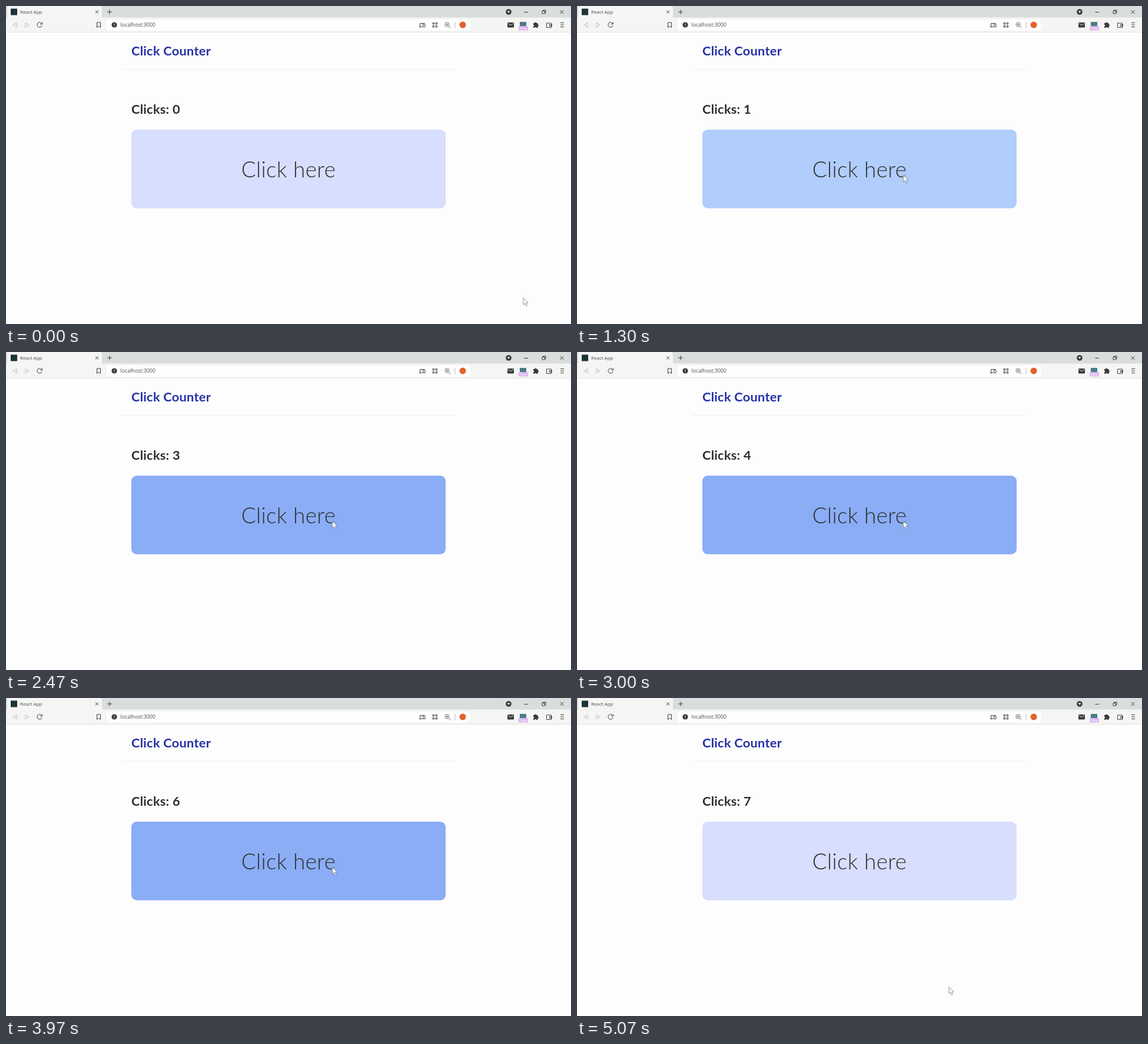
Write an HTML page that moves like this. It is 960 px wide and 540 px high and loops after 5110 ms.

```html
<!DOCTYPE html>
<html lang="en">
<head>
<meta charset="utf-8">
<title>Click Counter</title>
<style>
html, body { margin: 0; width: 100%; height: 100%; overflow: hidden; background: #fdfdfd; }
svg { display: block; width: 100%; height: 100%; }
.ui { font-family: "Open Sans", "Noto Sans", sans-serif; fill: #4a4a4a; }
.page { font-family: Lato, "Open Sans", sans-serif; font-weight: 700; font-size: 21.8px; letter-spacing: .25px; fill: #2e2e2e; }
.line { fill: none; stroke: #3c3c3c; stroke-width: 1; }
.pale { fill: none; stroke: #bcbcbc; stroke-width: 1; }
.dark { fill: #383838; }
</style>
</head>
<body>
<svg viewBox="0 0 960 540">
  <rect width="960" height="540" fill="#fdfdfd"/>

  <!-- tab strip -->
  <rect width="960" height="20" fill="#d9dddd"/>
  <path d="M2 20V3q0-3 3-3H160q3 0 3 3V20z" fill="#f5f5f4"/>
  <rect x="8" y="4.500" width="11" height="11" fill="#1d3437"/>
  <text class="ui" x="24" y="13" font-size="8">React App</text>
  <path class="line" d="M152 7.500l5 5m0-5l-5 5M172 10h8M176 6v8"/>
  <circle class="dark" cx="854" cy="10" r="4.800"/>
  <path d="M851.500 8.500h5l-2.500 3.500z" fill="#f5f5f4"/>
  <path class="line" d="M880.500 10.500h6.500M911 8.500h4.500V13H911zM912.500 8V7H917v4.500h-1M941.500 7l6 6m0-6l-6 6"/>

  <!-- toolbar -->
  <rect y="19.500" width="960" height="25" fill="#f5f5f4"/>
  <rect y="44" width="960" height="1" fill="#e2e2e0"/>
  <rect x="171" y="23" width="617" height="18.500" rx="2" fill="#fefefe"/>
  <path class="pale" d="M18 28.500v7L12 32zM33 28.500v7L39 32z"/>
  <path class="line" d="M60.500 29.500A4.200 4.200 0 1 0 61.200 33M61.500 27.500v3.200h-3.500M154.500 28h6v8.500l-3-2.500-3 2.500z"/>
  <circle class="dark" cx="184" cy="32" r="4.600"/>
  <path d="M184 29.500v3m0 1v1.200" stroke="#fefefe"/>
  <text class="ui" x="194.500" y="35" font-size="8.800">localhost:3000</text>
  <path class="line" d="M702 35.500h5M703.500 35v-5.500h8M708.500 31h3.500v4.500h-3.500z"/>
  <path class="line" d="M725 28.500h2.500V31H725zM730 28.500h2.500V31H730zM725 33.500h2.500V36H725zM730 33.500h2.500V36H730z"/>
  <g opacity=".75">
    <path class="line" d="M752.500 34.500l3 3M747.500 31.500h4M749.500 29.500v4"/>
    <circle class="line" cx="749.500" cy="31.500" r="3.600"/>
  </g>
  <path class="pale" d="M763 27v11"/>
  <circle cx="776" cy="32" r="5.500" fill="#e2622c"/>
  <rect class="dark" x="852" y="28" width="11" height="8.500" rx="1"/>
  <path d="M853 29.500l4.500 3.200 4.500-3.200" fill="none" stroke="#f5f5f4"/>
  <rect x="873" y="27" width="11" height="8" fill="#4a7c86"/>
  <rect x="871" y="34" width="16" height="7.500" rx="1.500" fill="#dcb4ee"/>
  <text class="ui" x="879" y="40" font-size="6" text-anchor="middle" style="fill:#fff">New</text>
  <path class="dark" d="M896 29h2.200a1.600 1.600 0 0 1 3.200 0h2.100v2.200a1.600 1.600 0 0 1 0 3.200V37h-2.600a1.300 1.300 0 0 0-2.600 0H896v-2.500a1.300 1.300 0 0 0 0-2.600z"/>
  <path class="line" d="M918.500 29h8v7.500h-8zM923.500 31.500h4v2.800h-4zM942 28.500h6M942 32h6M942 35.500h6"/>

  <!-- page -->
  <text class="page" x="213" y="83.500" style="fill:#2430a6">Click Counter</text>
  <path d="M196 107.500H764" stroke="#ececf1"/>
  <text class="page" id="count" x="213" y="182.500">Clicks: 0</text>
  <rect id="button" x="213" y="210" width="534" height="133.500" rx="9"/>
  <text class="page" x="480" y="291" text-anchor="middle" style="font-size:37px;font-weight:300;letter-spacing:.3px">Click here</text>
  <path id="cursor" d="M0 0V11.800L2.700 9.300 4.700 13.900 6.600 13 4.600 8.600H8.200z" fill="#fff" stroke="#7c7c7c" stroke-width=".8" stroke-linejoin="round"/>
</svg>
<script>
const LOOP = 5110;
const IDLE = [216, 222, 253], HOVER = [180, 208, 251], ACTIVE = [138, 173, 246];
// press and release time of each click
const clicks = [[1000, 1170], [1430, 1600], [1930, 2110], [2280, 2560],
                [2810, 3010], [3220, 3490], [3740, 4150]];
const fades = [
  [410, HOVER, 400],
  ...clicks.flatMap(([down, up]) => [[down, ACTIVE, 190], [up, HOVER, 190]]),
  [4600, IDLE, 380]
];
const path = [[30, 879, 495.5], [530, 554.5, 287], [4470, 554.5, 287], [4800, 632, 490.5]];

const get = id => document.getElementById(id);
const count = get("count"), button = get("button"), cursor = get("cursor");
const part = (t, start, length) => Math.min(1, Math.max(0, (t - start) / length));
const mix = (a, b, k) => a + (b - a) * k;
const easeOut = k => 1 - (1 - k) ** 2;
const easeInOut = k => k * k * (3 - 2 * k);

function draw(now) {
  const t = now % LOOP;
  const clicked = clicks.filter(([, up]) => t >= up).length;
  count.textContent = "Clicks: " + clicked;

  let color = IDLE;
  for (const [start, target, length] of fades) {
    const k = easeOut(part(t, start, length));
    color = color.map((v, i) => mix(v, target[i], k));
  }
  button.setAttribute("fill", `rgb(${color.map(Math.round)})`);

  let [, x, y] = path[0];
  for (let i = 1; i < path.length; i++) {
    const [from] = path[i - 1], [to, nx, ny] = path[i];
    const k = easeInOut(part(t, from, to - from));
    x = mix(x, nx, k);
    y = mix(y, ny, k);
  }
  cursor.setAttribute("transform", `translate(${x} ${y})`);
}

const begin = performance.now();
function tick() {
  draw(performance.now() - begin);
  requestAnimationFrame(tick);
}
tick();
</script>
</body>
</html>
```
